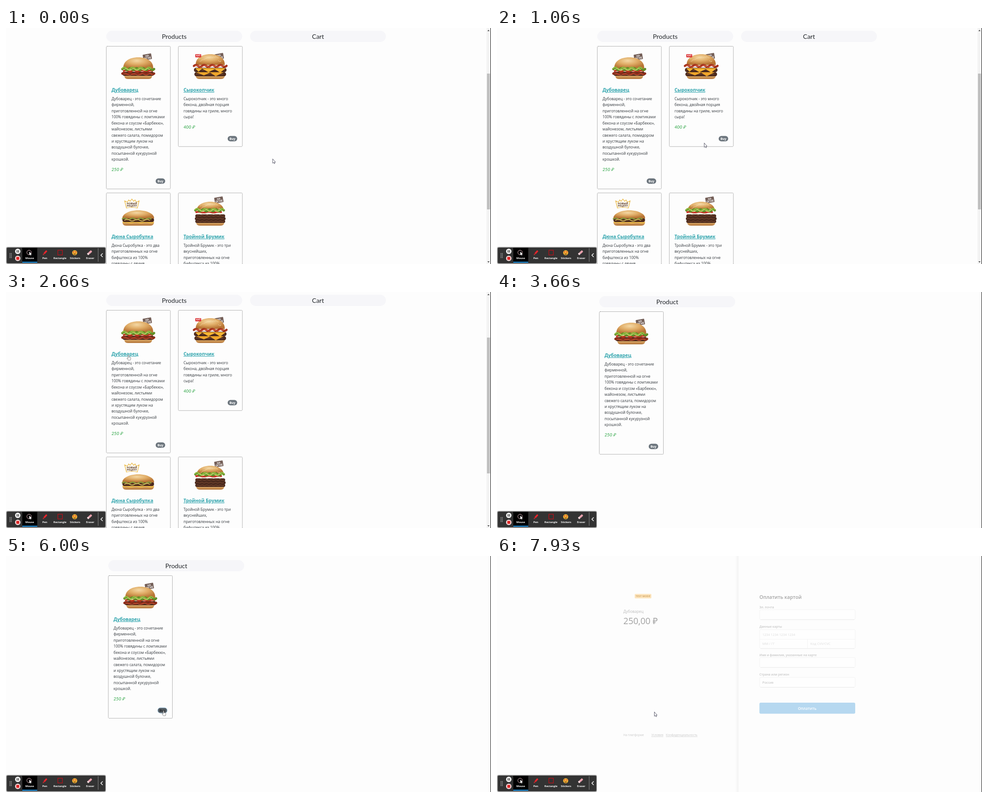
Animation of 1071 by 523 pixels, one loop 8 s. Source, as an HTML page:

```html
<!DOCTYPE html>
<html lang="ru">
<head>
<meta charset="utf-8">
<title>Shop</title>
<style>
html, body { margin: 0; width: 100%; height: 100%; overflow: hidden; background: #fdfdfd; }
svg { display: block; font-family: "Open Sans", "Noto Sans", sans-serif; }
.head { font: 14px Lato, sans-serif; fill: #212529; text-anchor: middle; }
.name { font-size: 10.3px; font-weight: 700; fill: #2fa4ad; text-decoration: underline; }
.body { font-size: 8.4px; fill: #33383d; }
.price { font: italic 500 9.7px Lato, "Open Sans", sans-serif; fill: #35a84c; }
.buy { font-size: 6.9px; font-weight: 700; fill: #fff; text-anchor: middle; }
.tool { font-size: 5.8px; font-weight: 700; fill: #fff; text-anchor: middle; }
.label { font-size: 6.8px; font-weight: 600; fill: #c6c6c6; }
.hint { font-size: 7.3px; fill: #dcdcdc; }
.foot { font-size: 6.5px; fill: #c8c8c8; }
.link { text-decoration: underline; }
</style>
</head>
<body>
<svg id="stage" width="1071" height="523" viewBox="0 0 1071 523"></svg>
<script>
const LOOP = 8000;
const text = (x, y, cls, s, extra = '') => `<text x="${x}" y="${y}" class="${cls}" ${extra}>${s}</text>`;
const rect = (x, y, w, h, fill, rx = 0, extra = '') =>
  `<rect x="${x}" y="${y}" width="${w}" height="${h}" rx="${rx}" fill="${fill}" ${extra}/>`;
const path = (d, fill, extra = '') => `<path d="${d}" fill="${fill}" ${extra}/>`;
const group = (x, y, inner, extra = '') => `<g transform="translate(${x} ${y}) ${extra}">${inner}</g>`;

// Food, drawn around x = 0 with y measured from the card top
const dome = (w, top, base) =>
  path(`M${-w} ${base}C${-w - 1} ${top + 9} ${-w * .6} ${top} 0 ${top}S${w + 1} ${top + 9} ${w} ${base}Z`, 'url(#bun)');
const heel = (w, y, h) => path(`M${-w} ${y}H${w}Q${w} ${y + h} ${w - 8} ${y + h}H${8 - w}Q${-w} ${y + h} ${-w} ${y}Z`, 'url(#heel)');
const wave = (w, y, color, width, amp = 2, step = 7) =>
  path(`M${-w} ${y}q${step / 2} ${-2 * amp} ${step} 0` + `t${step} 0`.repeat(Math.floor(2 * w / step) - 1),
    'none', `stroke="${color}" stroke-width="${width}" stroke-linecap="round"`);
const patty = (w, y, h) => rect(-w, y, 2 * w, h, '#4b2a1d', h / 2) + wave(w - 3, y + h / 2, '#75462f', 1.2, .9, 5);
const lettuce = (w, y) => wave(w, y + 1, '#5f8f27', 5, 2) + wave(w, y - .5, '#8fb83f', 3, 2.5, 9) + wave(w - 4, y + 2, '#c5d876', 1.2, 2, 8);
const seeds = (w, top) => Array.from({ length: 22 }, (_, i) => {
  const u = ((i * 0.618) % 1) * 2 - 1, v = (i * 0.37) % 1;
  return `<ellipse cx="${u * w * .75}" cy="${top + 4 + u * u * 6 + v * 8}" rx=".9" ry=".6" fill="#f6dfb0"/>`;
}).join('');
const flag = (x, y) => group(x, y,
  path('M-8 4V13', 'none', 'stroke="#a98158"') + rect(-9.5, -6.3, 19, 12.6, '#745f58', 1) +
  text(0, -.5, 'tool', 'НА', 'style="font-size:5.4px"') +
  text(0, 4.8, 'tool', 'ОГНЕ', 'style="font-size:6px"'), 'rotate(-10)');

const steak = flag(20, 24) + heel(31, 64, 9) + patty(35, 57, 9) + wave(35, 61, '#8d2d1a', 5, 1.5) +
  wave(32, 63, '#c4573a', 1.5, 1.5, 9) + dome(33, 25, 50) + wave(32, 55, '#bf3520', 4, 1, 9) + lettuce(35, 50);
const bacon = flag(20, 23) + heel(32, 65, 8) + patty(35, 58, 9) + path('M-32 58H30L12 67 0 59-14 65Z', '#eea52a') +
  patty(36, 48, 10) + path('M-33 49H34L22 59 10 51-4 58-18 50-26 57Z', '#f5b331') +
  dome(32, 18, 42) + seeds(32, 18) + wave(36, 44, '#a5321e', 5, 2, 9) + wave(34, 45, '#d8694c', 1.5, 2, 9) +
  rect(-33, 18, 13, 7, '#d92b2e', 1) + text(-26.5, 23.3, 'tool', 'ХИТ', 'style="font-size:5px"');
const long = heel(35, 64, 9) + wave(33, 66, '#f3c13e', 2, 1, 11) + patty(35, 56, 9) +
  dome(35, 39, 57) + wave(35, 58, '#87963a', 3, 1.5, 9) + wave(30, 61, '#c9b35c', 1.8, 2, 11) +
  path('M-26 34L-30 18-24 21-21 16-18 19-14 14-10 19-7 16-4 21 2 18-2 34Q-14 31-26 34Z', '#fffdf4',
    'stroke="#e8b33a" stroke-width="1.2"') +
  text(-14, 26, 'tool', 'НОВЫЙ', 'style="font-size:5.8px;fill:#5a3928"') +
  text(-14, 31.2, 'tool', 'РЕЦЕПТ', 'style="font-size:5.8px;fill:#5a3928"');
const triple = flag(19, 16) + heel(31, 65, 8) + patty(33, 60, 7) + patty(34, 54, 7) + patty(33, 48, 7) +
  wave(31, 46, '#f4ece0', 3, 1) + wave(31, 43, '#c93125', 4, .8, 11) +
  dome(29, 20, 37) + seeds(29, 19) + lettuce(33, 38);

const STEAK = 'Дубоварец';
const products = [
  [STEAK, steak, 250, `${STEAK} - это сочетание|фирменной,|приготовленной на огне|100% говядины с ломтиками|бекона и соусом «Барбекю»,|майонезом, листьями|свежего салата, помидором|и хрустящим луком на|воздушной булочке,|посыпанной кукурузной|крошкой.`],
  ['Сырокопчик', bacon, 400, 'Сырокопчик - это много|бекона, двойная порция|говядины на гриле, много|сыра!'],
  ['Дюна Сыробулка', long, 300, 'Дюна Сыробулка - это два|приготовленных на огне|бифштекса из 100%|говядины с двумя'],
  ['Тройной Брумик', triple, 450, 'Тройной Брумик - это три|вкуснейших,|приготовленных на огне|бифштекса из 100%'],
];

function card(x, y, [name, food, price, copy], buyId = '') {
  const lines = copy.split('|'), last = 117 + (lines.length - 1) * 13.42;
  return group(x, y,
    rect(.5, .5, 141.5, last + 65, '#fdfdfd', 2, 'stroke="#8f8f8f" stroke-dasharray="2 1"') +
    group(71, 0, food) + text(12, 101, 'name', name) +
    lines.map((s, i) => text(12, 120 + i * 13.42, 'body', s)).join('') +
    text(12, last + 26, 'price', price + ' ₽') +
    `<g ${buyId}>` + rect(109.5, last + 42, 21, 12, '#6c757d', 6) + text(120, last + 50.4, 'buy', 'Buy') + '</g>');
}
const heading = (x, y, s) => rect(x, y, 300, 25, '#f6f6f9', 12.5) + text(x + 150, y + 17.5, 'head', s);

const listPage = heading(221.5, 6, 'Products') + heading(539, 6, 'Cart') +
  products.map((p, i) => card(i % 2 ? 380 : 221, i < 2 ? 40 : 365, p)).join('') +
  rect(1061, 0, 9, 523, '#f4f4f4') + rect(1062, 101, 7, 301, '#c1c1c1') +
  path('M1063 7l2.5-3 2.5 3zM1063 517l2.5 3 2.5-3z', '#555');

const itemPage = heading(226, 9, 'Product') + card(225.5, 43, products[0], 'id="buy"');

const field = (y, h) => rect(580, y, 211, h, '#fefefe', 3, 'stroke="#f3f3f3"') +
  path(`M582 ${y + h}H789`, 'none', 'stroke="#ebebeb"');
const payForm = rect(304, 84, 37, 10, '#fde6c0', 2) +
  text(322.5, 91.2, 'tool', 'TEST MODE', 'style="fill:#d1a562"') +
  text(279, 126.3, 'body', STEAK, 'style="fill:#bdbdbd"') +
  text(279, 151, '', '250,00 ₽', 'font-size="19.3" font-weight="500" fill="#a2a2a2"') +
  text(579.5, 95.3, '', 'Оплатить картой', 'font-size="10.7" font-weight="600" fill="#a2a2a2"') +
  text(579.5, 116, 'label', 'Эл. почта') + field(119, 22) +
  text(579.5, 159, 'label', 'Данные карты') + field(163, 42) +
  path('M580 184.5H791M685.5 185V205', 'none', 'stroke="#f3f3f3"') +
  text(586, 176.7, 'hint', '1234 1234 1234 1234') + text(586, 197, 'hint', 'ММ / ГГ') +
  text(692, 197, 'hint', 'Код CVV/CVC') +
  text(579.5, 222, 'label', 'Имя и фамилия, указанные на карте') + field(225, 22) +
  text(579.5, 264.5, 'label', 'Страна или регион') + field(269, 22) +
  text(586, 283, 'hint', 'Россия', 'style="fill:#b8b8b8"') +
  rect(579.5, 325, 211.5, 24.5, '#b6d8f0', 3) +
  text(685, 340.5, 'buy', 'Оплатить', 'style="font-size:8.4px;font-weight:600"') +
  text(279, 399, 'foot', 'На платформе') + text(341, 399, 'foot link', 'Условия') +
  text(373, 399, 'foot link', 'Конфиденциальность');
const payPage = rect(526, 0, 8, 523, 'url(#fold)') + `<g id="form">${payForm}</g>`;

const tools = ['Mouse', 'Pen', 'Rectangle', 'Stickers', 'Eraser'];
const toolbar = rect(0, 484.5, 221, 39, '#000', 4, 'opacity=".18"') + rect(1, 486, 219, 36, '#6a6a6a', 3) +
  rect(2, 487, 217, 34, '#333', 2) +
  rect(36, 487, 33, 33, '#000') + rect(36, 518, 33, 2, '#1b9af0') +
  [0, 1, 2, 3].map(i => rect(8, 499 + i * 3, 1.4, 1.4, '#ddd') + rect(11, 499 + i * 3, 1.4, 1.4, '#ddd')).join('') +
  '<circle cx="26" cy="495" r="6" fill="#f4f4f4"/><circle cx="26" cy="510.5" r="6" fill="#f4dcdc"/>' +
  rect(23.6, 492.3, 1.6, 5.4, '#333') + rect(26.8, 492.3, 1.6, 5.4, '#333') + rect(22.7, 507.2, 6.6, 6.6, '#dc2525', 1) +
  tools.map((s, i) => text(52.3 + i * 33.4, 512.3, 'tool', s)).join('') +
  '<circle cx="51" cy="497.5" r="5" fill="none" stroke="#e7bcc3"/>' +
  path('M51.5 495.5V503.5L53.3 502 54.5 504.3 55.7 503.6 54.6 501.5H57Z', '#fff') +
  group(86, 498, rect(-1.8, -6, 3.6, 9, '#e5242b', 1) + path('M-1.8 4H1.8L0 7Z', '#e5242b'), 'rotate(42)') +
  rect(114.5, 492.5, 10, 10.5, 'none', 0, 'stroke="#b5121b" stroke-width="1.4"') +
  '<circle cx="151.7" cy="498" r="5.6" fill="#f6bd38"/>' +
  path('M148 500q3.7 4 7.4 0z', '#7a3b12') +
  '<circle cx="149.3" cy="496.3" r="1.4" fill="#d9372c"/><circle cx="154" cy="496.3" r="1.4" fill="#d9372c"/>' +
  group(184.5, 498, rect(-2.3, -6, 4.6, 8, '#e9a0ad', 1) + rect(-2.3, 2, 4.6, 4, '#f3d6da', 1), 'rotate(48)') +
  path('M203.5 488V518', 'none', 'stroke="#888"') +
  path('M213.5 499.5L209.5 503.5 213.5 507.5', 'none', 'stroke="#fff" stroke-width="1.5"');

const arrow = path('M0 0V9.6L2.1 7.8 3.6 10.8 5 10.1 3.7 7.3H6.3Z', '#fff', 'stroke="#4a4a5c" stroke-width=".9"');
const hand = path('M-.9.3Q0-.7 .9.3V4.2L4.2 5Q5.2 5.3 5 6.6L4.2 11H-.6L-3.3 7.2Q-3.6 6-2.3 6.2L-.9 7.4Z', '#fff',
  'stroke="#6b6b6b" stroke-width=".8"');

const stops = (...pairs) => pairs.map(([o, c]) => `<stop offset="${o}" stop-color="${c}"/>`).join('');
const $ = id => document.getElementById(id);
const layer = (id, inner) => `<g id="${id}">${inner}</g>`;
$('stage').innerHTML =
  `<defs><radialGradient id="bun" cx=".45" cy=".3" r=".65">${stops([0, '#f4d8a4'], [.5, '#e0ac66'], [1, '#b87535'])}</radialGradient>
  <linearGradient id="heel" x2="0" y2="1">${stops([0, '#e9bd7b'], [1, '#b07034'])}</linearGradient>
  <linearGradient id="fold">${stops([0, '#fdfdfd'], [.8, '#f4f4f4'], [1, '#fbfbfb'])}</linearGradient></defs>` +
  rect(0, 0, 1071, 523, '#fdfdfd') + layer('list', listPage) + layer('item', itemPage) + layer('pay', payPage) +
  rect(1070, 0, 1, 523, '#111') + toolbar + layer('arrow', arrow) + layer('hand', hand);

const track = [
  [0, 589, 290], [1060, 458, 255], [1600, 270.5, 142], [1930, 270.5, 142], [2600, 270.5, 140],
  [3660, 270.5, 140], [4330, 345, 338], [4600, 345, 338], [4930, 348, 343], [7190, 348, 343],
  [7200, 347.5, 345.5], [LOOP, 347.5, 345.5],
];
function pointer(t) {
  const i = track.findIndex(k => k[0] > t), [t0, x0, y0] = track[i - 1], [t1, x1, y1] = track[i];
  const u = (t - t0) / (t1 - t0);
  return [x0 + (x1 - x0) * u, y0 + (y1 - y0) * u];
}
const show = (id, on) => $(id).style.display = on ? '' : 'none';
const within = (t, a, b) => t >= a && t < b;
const [buyPill, buyText] = $('buy').children;

function draw(t) {
  show('list', t < 2730);
  show('item', within(t, 2730, 6330));
  show('pay', t >= 6330);
  $('form').style.opacity = Math.max(0, Math.min(1, (t - 7600) / 330));

  const pressed = t >= 5990;
  buyPill.setAttribute('fill', pressed ? '#565e64' : t > 4300 ? '#5c636a' : '#6c757d');
  buyPill.setAttribute('stroke', pressed ? '#a5cbe6' : 'none');
  buyText.style.fill = pressed ? '#24282c' : '#fff';

  const onLink = within(t, 1540, 2730) || within(t, 4300, 7200);
  const visible = !within(t, 2730, 3700);
  const [x, y] = pointer(t);
  for (const id of ['arrow', 'hand']) $(id).setAttribute('transform', `translate(${x} ${y})`);
  show('arrow', visible && !onLink);
  show('hand', visible && onLink);
}
const start = performance.now();
function tick() {
  draw((performance.now() - start) % LOOP);
  requestAnimationFrame(tick);
}
tick();
</script>
</body>
</html>
```
